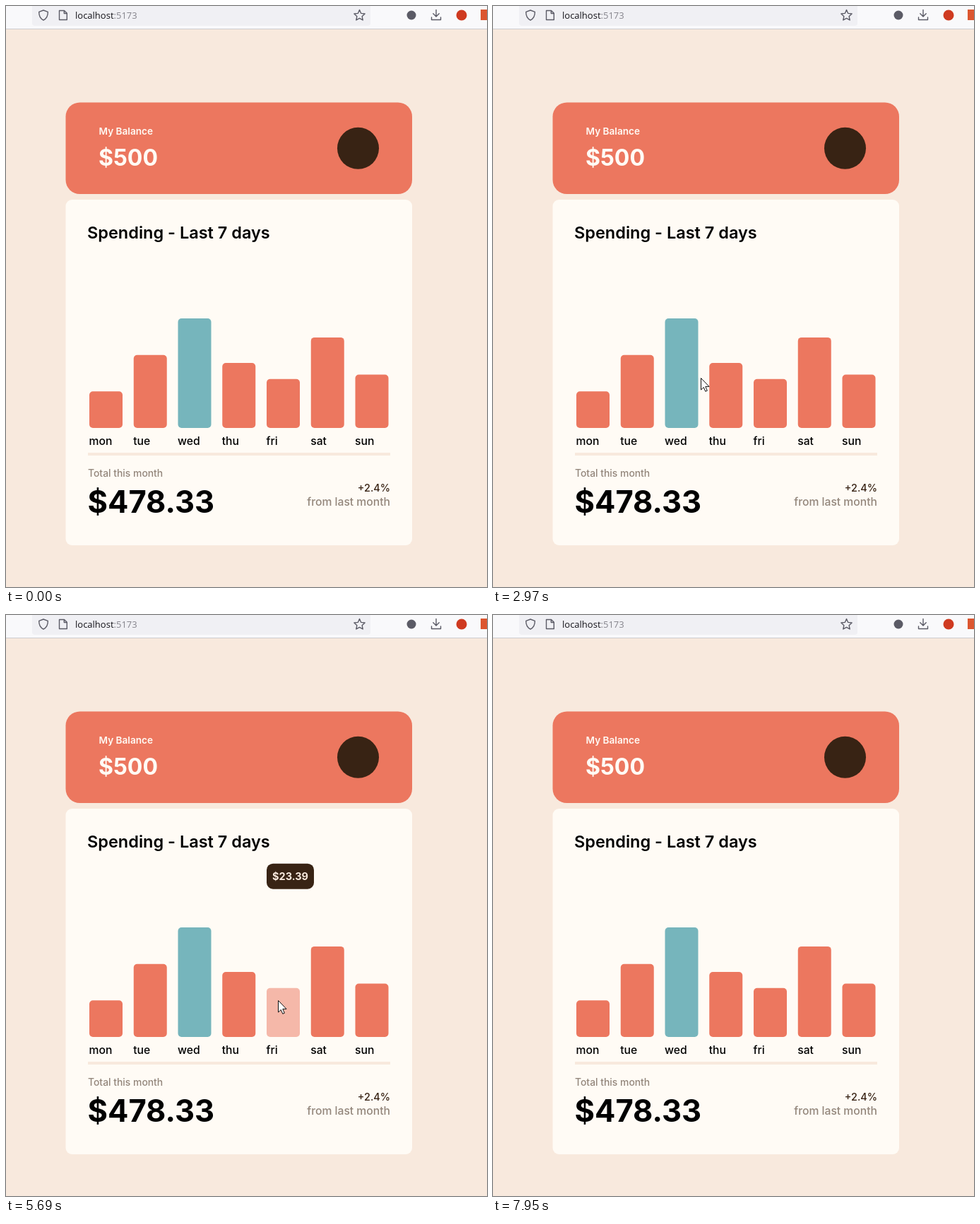
Animation, 681 px wide and 822 px high, one loop 8.61 s. Source, as an HTML page:

```html
<!DOCTYPE html>
<html lang="en">
<head>
<meta charset="utf-8">
<title>Spending chart</title>
<style>
  html, body { margin: 0; width: 100%; height: 100%; overflow: hidden; background: #f8e9dd; }
  svg { display: block; font-family: Inter, "Open Sans", sans-serif; }
  .url { font: 13px "Open Sans", "Noto Sans", sans-serif; }
  .icon { fill: none; stroke: #5b5b66; stroke-width: 1.4; stroke-linejoin: round; stroke-linecap: round; }
  .medium { font-weight: 500; }
  .semi { font-weight: 600; }
  .bold { font-weight: 700; }
</style>
</head>
<body>
<svg width="681" height="822" viewBox="0 0 681 822">
  <!-- Browser bar -->
  <rect width="681" height="32" fill="#f9f9fb"/>
  <rect y="32" width="681" height="1" fill="#ccccd0"/>
  <rect x="37" y="-8" width="479" height="36" rx="4" fill="#f0f0f4"/>
  <g class="icon">
    <path d="M53 6 L59.3 8.3 Q59.5 17 53 20 Q46.5 17 46.7 8.3 Z"/>
    <path d="M75.5 6.5 H82.5 L86.3 10.3 V19.5 H75.5 Z M82.3 6.8 V10.5 H86"/>
    <path id="star"/>
    <path d="M609 5.5 V14.8 M604.8 10.8 L609 15 L613.2 10.8 M602.5 16 V19.5 H615.5 V16"/>
  </g>
  <circle cx="574" cy="13" r="6.5" fill="#5b5b66"/>
  <circle cx="645" cy="13" r="7.5" fill="#cf3a20"/>
  <rect x="672" y="5" width="15" height="15" fill="#dc5630"/>
  <text class="url" x="98" y="18" fill="#15141a">localhost<tspan fill="#85848c">:5173</tspan></text>

  <!-- Balance card -->
  <rect x="84.5" y="136.5" width="490.5" height="129.5" rx="20" fill="#ec775f"/>
  <g fill="#fffbf5">
    <text class="semi" x="131.5" y="182" font-size="13.6">My Balance</text>
    <text class="bold" x="131" y="225.5" font-size="32">$500</text>
  </g>
  <circle cx="498.5" cy="201.3" r="29.5" fill="#382314"/>

  <!-- Spending card -->
  <rect x="84.5" y="274" width="490.5" height="489" rx="9" fill="#fffbf5"/>
  <text class="semi" x="115" y="329" font-size="23.5">Spending - Last 7 days</text>
  <g id="bars"></g>
  <rect x="116" y="632" width="428" height="4" fill="#f8e9dd"/>
  <text class="medium" x="116" y="666" font-size="13.9" fill="#93867b">Total this month</text>
  <text class="bold" x="115.5" y="717" font-size="43.5">$478.33</text>
  <g class="medium" text-anchor="end">
    <text x="544" y="686.5" font-size="14.4" fill="#382314">+2.4%</text>
    <text x="544" y="707" font-size="15.7" fill="#93867b">from last month</text>
  </g>

  <g id="tip" class="bold">
    <rect id="tipBox" y="-18" height="36" rx="9" fill="#382314"/>
    <text id="tipText" y="5.3" font-size="14.5" text-anchor="middle" fill="#f8e9dd"></text>
  </g>
  <path id="cursor" d="M.5 .5 V17 L4.3 13.5 L6.8 19.3 L9.3 18.2 L6.8 12.4 H12 Z" fill="#fff" stroke="#111" stroke-linejoin="round"/>
</svg>
<script>
const LOOP = 8610, STEP = 70, GROW = 400;
const BASE = 597, BAR_WIDTH = 47, PX_PER_DOLLAR = 2.96;
const byId = id => document.getElementById(id);
const barX = i => 118 + 62.75 * i;

const spending = { mon: 17.45, tue: 34.91, wed: 52.36, thu: 31.07, fri: 23.39, sat: 43.28, sun: 25.48 };
const amounts = Object.values(spending);

byId("bars").innerHTML = Object.entries(spending).map(([day, amount], i) => {
  const height = amount * PX_PER_DOLLAR;
  const fill = amount === Math.max(...amounts) ? "#76b5bc" : "#ec775f";
  return `<rect x="${barX(i)}" y="${BASE - height}" width="${BAR_WIDTH}" height="${height}" rx="5" fill="${fill}"/>
    <text class="medium" x="${barX(i) - 0.5}" y="621" font-size="15.7">${day}</text>`;
}).join("");
const bars = byId("bars").querySelectorAll("rect");

const starPoints = Array.from({ length: 10 }, (_, i) => {
  const radius = i % 2 ? 3.8 : 8, angle = i * Math.PI / 5;
  return [500.5 + radius * Math.sin(angle), 13.5 - radius * Math.cos(angle)];
});
byId("star").setAttribute("d", `M${starPoints.join("L")}Z`);

// The pointer travels in a straight line from one stop to the next; bar is the one it rests on.
const entry = { x: 698, y: 826 };
const moves = [
  { start: 660, duration: 630, x: 266, y: 513, bar: 2 },
  { start: 2900, duration: 300, x: 325, y: 541, bar: 3 },
  { start: 4400, duration: 240, x: 371, y: 547, bar: 4 },
  { start: 5690, duration: 400, x: 453, y: 534, bar: 5 },
  { start: 7530, duration: 420, x: 589, y: 800 }
];

const cubicOut = p => 1 - (1 - p) ** 3;
const isOver = (bar, x) => x >= barX(bar) && x <= barX(bar) + BAR_WIDTH;

function stateAt(t) {
  const index = moves.findLastIndex(move => t >= move.start);
  if (index < 0) return {};
  const move = moves[index], from = moves[index - 1] || entry;
  const elapsed = (Math.floor((t - move.start) / STEP) + 1) * STEP;
  if (move.bar === undefined && elapsed > move.duration) return {};

  const p = Math.min(1, elapsed / move.duration);
  const x = from.x + (move.x - from.x) * p, y = from.y + (move.y - from.y) * p;
  const pointer = [Math.round(x), Math.round(y)];

  if (isOver(move.bar, x)) {
    const edge = barX(move.bar) + (move.x < from.x ? BAR_WIDTH : 0);
    const entered = move.duration * (edge - from.x) / (move.x - from.x);
    return { pointer, bar: move.bar, scale: cubicOut(Math.min(1, (elapsed - entered) / GROW)) };
  }
  return isOver(from.bar, x) ? { pointer, bar: from.bar, scale: 1 } : { pointer };
}

function draw(t) {
  const { pointer, bar, scale } = stateAt(t);
  const tip = byId("tip"), cursor = byId("cursor");
  bars.forEach((rect, i) => rect.setAttribute("opacity", i === bar ? 0.5 : 1));

  tip.style.display = bar === undefined ? "none" : "";
  if (bar !== undefined) {
    byId("tipText").textContent = "$" + amounts[bar].toFixed(2);
    const width = byId("tipText").getComputedTextLength() + 16;
    byId("tipBox").setAttribute("x", -width / 2);
    byId("tipBox").setAttribute("width", width);
    tip.setAttribute("transform", `translate(${barX(bar) + width / 2} 369.7) scale(${scale})`);
    tip.setAttribute("opacity", scale);
  }

  cursor.style.display = pointer ? "" : "none";
  if (pointer) cursor.setAttribute("transform", `translate(${pointer})`);
}

function tick() {
  draw(Math.round(performance.now() / 10) * 10 % LOOP);
  requestAnimationFrame(tick);
}
tick();
</script>
</body>
</html>
```
